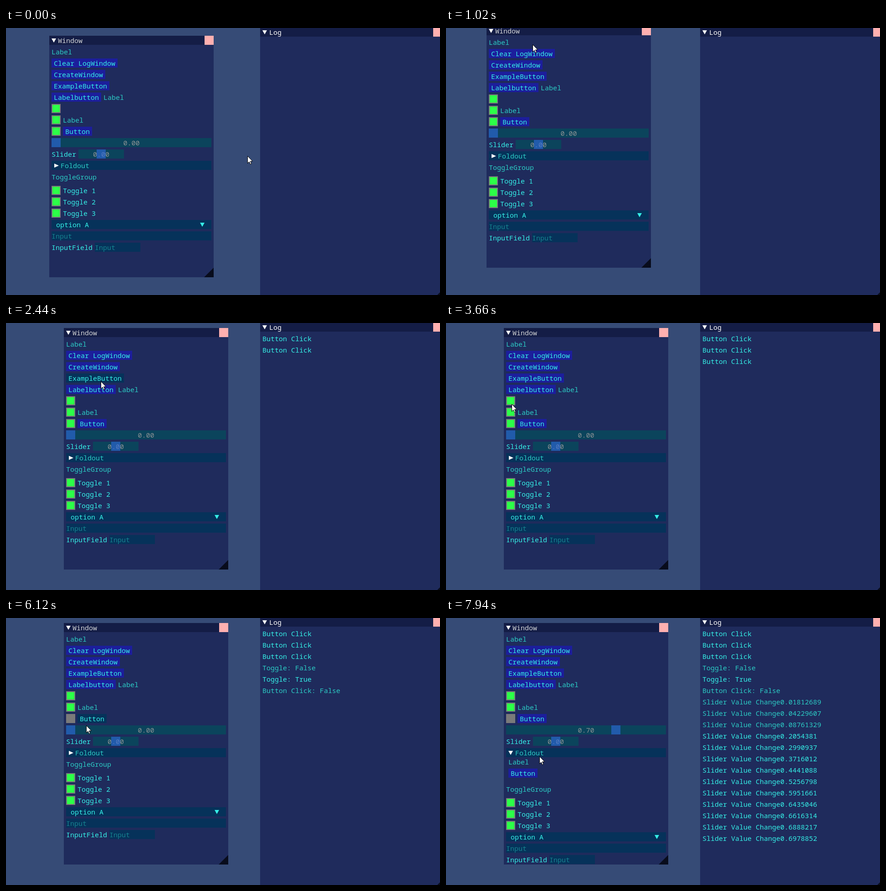
These frames come from a looping animation (953x587 px, 8 s). An HTML page with a canvas:

```html
<!DOCTYPE html>
<html lang="en">
<head>
<meta charset="utf-8">
<title>Immediate mode windows</title>
<style>
  html, body { margin: 0; width: 100%; height: 100%; overflow: hidden; background: #364b76; }
  canvas { display: block; }
</style>
</head>
<body>
<canvas width="953" height="587"></canvas>
<script>
const ctx = document.querySelector('canvas').getContext('2d');
const LOOP = 8000, STEP = 203.6;
const C = {
  back: '#364b76', body: '#1f2b5c', bar: '#141d46', close: '#ffb0b0', grip: '#080c1c',
  button: '#1c1e9c', field: '#06325a', track: '#0b445c', knob: 'rgba(49,108,224,.6)',
  bright: '#35efe6', dim: '#2ccbc4', hint: '#16828f', value: '#8c9294',
  on: '#2cff48', off: '#7a7a7a'
};

// Keys: [step, x, y]; positions between keys are linear, sampled once per step.
const cursorKeys = [
  [0, 530, 281], [1, 350, 130], [2, 190, 48], [3, 150, 58], [4, 85, 88], [5, 190, 36], [6, 240, 49],
  [7, 226, 92], [8, 210, 127], [12, 208, 128], [13, 200, 145], [14, 195, 151], [16, 192, 152],
  [17, 165, 168], [18, 144, 178], [19, 143, 180], [24, 144, 182], [26, 165, 222], [28, 176, 236],
  [30, 176, 236], [31, 148, 258], [32, 162, 258], [33, 253, 259], [34, 345, 259], [35, 376, 260],
  [36, 212, 299], [37, 203, 299], [39, 205, 304]
];
const windowKeys = [[0, 95, 17], [2, 95, 17], [3, 60, 35], [4, 3, 66], [5, 89, -4], [6, 127, 11], [39, 127, 11]];

// Slider values follow from the drag distance in pixels.
const drag = [0.01812689, 0.04229607, 0.08761329, 0.2054381, 0.2990937, 0.3716012, 0.4441088,
  0.5256798, 0.5951661, 0.6435046, 0.6616314, 0.6888217, 0.6978852];
const dragCount = { 31: 0, 32: 2, 33: 6, 34: 9, 35: 13 };
const events = [
  [9, 'Button Click'], [11, 'Button Click'], [15, 'Button Click'],
  [20, 'Toggle: False'], [22, 'Toggle: True'], [29, 'Button Click: False']
];

function at(keys, step) {
  const i = Math.max(1, keys.findIndex(k => k[0] >= step));
  const [s0, x0, y0] = keys[i - 1], [s1, x1, y1] = keys[i];
  const p = (step - s0) / (s1 - s0);
  return [Math.round(x0 + (x1 - x0) * p), Math.round(y0 + (y1 - y0) * p)];
}

function rect(x, y, w, h, color) {
  ctx.fillStyle = color;
  ctx.fillRect(x, y, w, h);
}

function poly(color, ...points) {
  ctx.fillStyle = color;
  ctx.beginPath();
  points.forEach(([x, y]) => ctx.lineTo(x, y));
  ctx.closePath();
  ctx.fill();
}

function text(str, x, y, color = C.bright) {
  ctx.fillStyle = color;
  ctx.fillText(str, x, y + 16);
}

const arrowDown = (x, y, color = '#fff') => poly(color, [x, y], [x + 10, y], [x + 5, y + 9]);
const arrowRight = (x, y) => poly('#fff', [x, y], [x + 10, y + 4.5], [x, y + 9]);

function button(label, x, y, hover) {
  rect(x, y, 9 * label.length + 10, 20, hover ? C.field : C.button);
  text(label, x + 5, y);
}

function toggle(y, on = true) {
  rect(5, y, 20, 20, C.off);
  if (on) rect(7, y + 2, 16, 16, C.on);
}

function slider(x, y, w, label, pos) {
  rect(x, y, w, 20, C.track);
  text(label, x + w / 2 - 18, y, C.value);
  rect(x + Math.round((w - 20) * pos), y, 20, 20, C.knob);
}

// Draws a window frame and its content in local coordinates.
function panel(title, x, y, w, h, titleColor, content) {
  ctx.save();
  ctx.translate(x, y);
  ctx.beginPath();
  ctx.rect(0, 0, w, h);
  ctx.clip();
  rect(0, 0, w, h, C.body);
  rect(0, 0, w, 20, C.bar);
  rect(w - 20, 0, 20, 20, C.close);
  arrowDown(5, 6);
  text(title, w > 380 ? 20 : 19, 0, titleColor);
  content();
  poly(C.grip, [w, h - 21], [w, h], [w - 21, h]);
  ctx.restore();
}

function controls(step, value) {
  const row = k => 25 + 25 * k;
  const open = step >= 38;
  text('Label', 5, row(0), C.dim);
  button('Clear LogWindow', 5, row(1));
  button('CreateWindow', 5, row(2));
  button('ExampleButton', 5, row(3), step >= 8 && step <= 12);
  button('Labelbutton', 5, row(4), step >= 14 && step <= 16);
  text('Label', 119, row(4), C.dim);
  toggle(row(5), step < 20 || step >= 22);
  toggle(row(6));
  text('Label', 30, row(6), C.dim);
  toggle(row(7), step < 29);
  button('Button', 30, row(7), step >= 27 && step <= 30);
  slider(5, row(8), 351, value.toFixed(2), value);
  text('Slider', 5, row(9));
  slider(64, row(9), 100, '0.00', 0.5);

  rect(5, row(10), 351, 20, C.field);
  text('Foldout', 25, row(10), C.dim);
  if (open) {
    arrowDown(10, row(10) + 6);
    text('Label', 10, row(10) + 20, C.dim);
    button('Button', 10, row(10) + 45);
    ctx.translate(0, 55);
  } else {
    arrowRight(11, row(10) + 6);
  }

  text('ToggleGroup', 5, row(11), C.dim);
  for (let i = 0; i < 3; i++) {
    toggle(row(12 + i) + 5);
    text('Toggle ' + (i + 1), 30, row(12 + i) + 5);
  }
  rect(5, 405, 351, 20, C.field);
  text('option A', 15, 405);
  arrowDown(331, 411, C.bright);
  rect(5, 430, 351, 20, C.field);
  text('Input', 5, 430, C.hint);
  text('InputField', 5, 455);
  rect(100, 455, 100, 20, C.field);
  text('Input', 100, 455, C.hint);
  if (open) ctx.translate(0, -55);
}

function cursor(x, y) {
  ctx.save();
  ctx.translate(x, y);
  ctx.beginPath();
  [[.5, .5], [.5, 16.5], [4, 13], [6.5, 18.5], [9, 17.5], [6.5, 12], [11.5, 12]]
    .forEach(([px, py]) => ctx.lineTo(px, py));
  ctx.closePath();
  ctx.fillStyle = '#fff';
  ctx.strokeStyle = '#000';
  ctx.fill();
  ctx.stroke();
  ctx.restore();
}

function draw(time) {
  const step = Math.min(39, Math.floor((time % LOOP + 10) / STEP));
  const moved = step < 31 ? 0 : dragCount[step] ?? drag.length;
  const value = moved ? drag[moved - 1] : 0;
  const lines = events.filter(([when]) => step >= when).map(([, line]) => line)
    .concat(drag.slice(0, moved).map(v => 'Slider Value Change' + v));

  ctx.font = '15px "Noto Sans Mono", monospace';
  rect(0, 0, 953, 587, C.back);
  panel('Log', 558, -1, 400, 598, '#fff', () => lines.forEach((line, i) =>
    text(line, 5, 25 + 25 * i, i === 3 || (i > 4 && i < 9) ? C.dim : C.bright)));
  panel('Window', ...at(windowKeys, step), 361, 531, '#d2d4d6', () => controls(step, value));
  cursor(...at(cursorKeys, step));
}

const start = performance.now();
function tick() {
  draw(performance.now() - start);
  requestAnimationFrame(tick);
}
tick();
</script>
</body>
</html>
```
